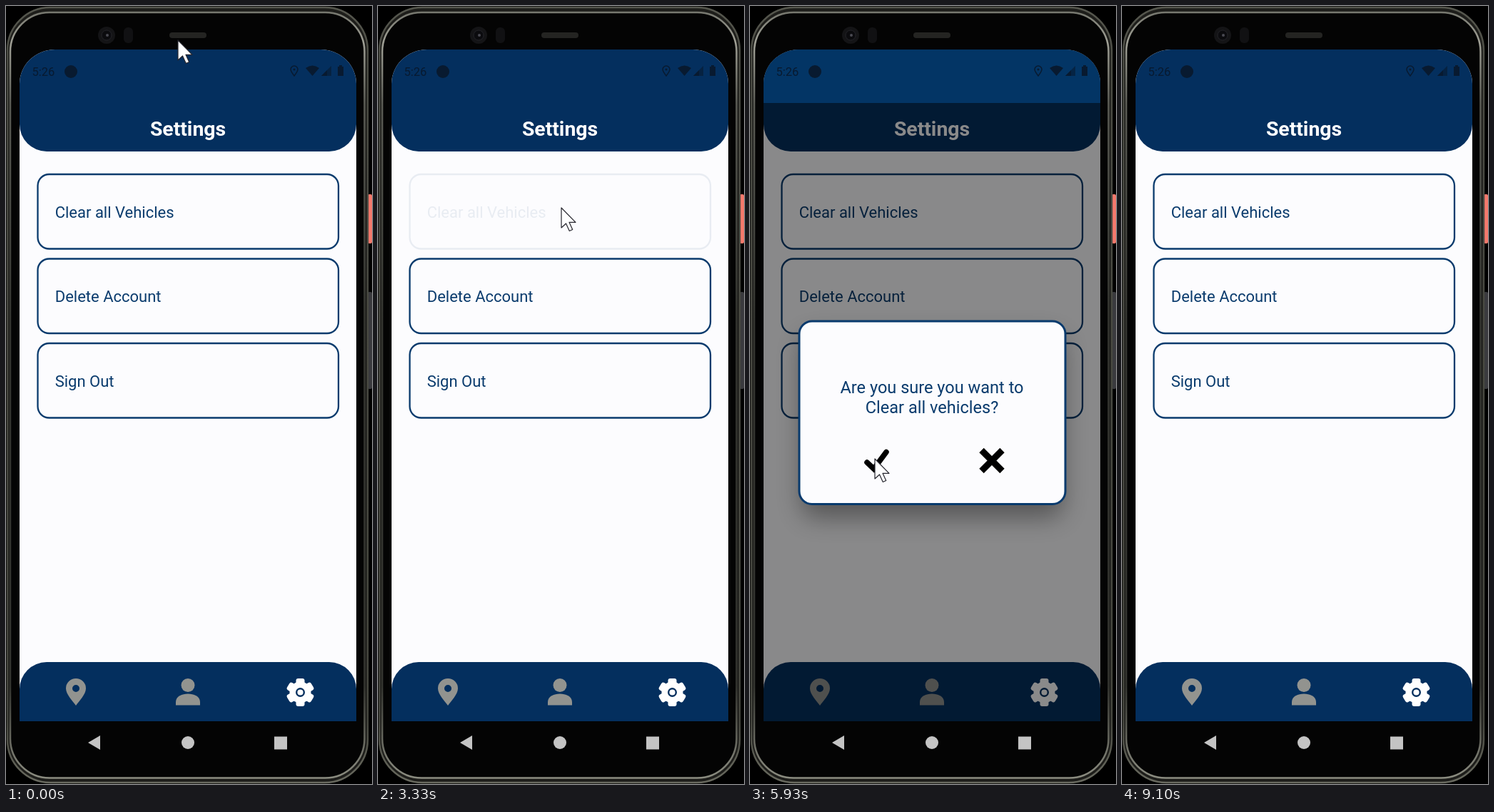
Write an HTML page that moves like this. It is 513 px wide and 1091 px high and loops after 9440 ms.

```html
<!DOCTYPE html>
<html lang="en">
<head>
<meta charset="utf-8">
<title>Settings</title>
<style>
  html, body { margin: 0; width: 100%; height: 100%; overflow: hidden; background: #000; }
  svg { display: block; width: 513px; height: 1091px; }
  text { font-family: Roboto, sans-serif; }
  .item rect { fill: none; stroke: #0a3b6d; stroke-width: 2.3; }
  .item text { fill: #0a3b6d; font-size: 22px; }
  .ask { fill: #0a3b6d; font-size: 23.55px; text-anchor: middle; }
</style>
</head>
<body>
<svg viewBox="0 0 513 1091">
  <defs>
    <clipPath id="screen"><path d="M19 1003V109A50 48 0 0 1 69 61H441A50 48 0 0 1 491 109V1003Z"/></clipPath>
    <linearGradient id="rim" x1="0" y1="0" x2="0" y2="1">
      <stop offset="0" stop-color="#56574e"/>
      <stop offset=".08" stop-color="#4a4b43"/>
      <stop offset=".92" stop-color="#45463e"/>
      <stop offset="1" stop-color="#6a6b60"/>
    </linearGradient>
    <linearGradient id="shine" x1="0" y1="0" x2="0" y2="1">
      <stop offset="0" stop-color="#77786f"/>
      <stop offset=".04" stop-color="#a0a096"/>
      <stop offset=".12" stop-color="#5a5b54"/>
      <stop offset=".4" stop-color="#33342f"/>
      <stop offset=".88" stop-color="#33342f"/>
      <stop offset="1" stop-color="#8b8c80"/>
    </linearGradient>
    <filter id="blur" x="-30%" y="-30%" width="160%" height="160%"><feGaussianBlur stdDeviation="17"/></filter>
  </defs>

  <!-- phone body -->
  <rect width="513" height="1091"/>
  <rect x="507" y="264" width="6" height="69" rx="2" fill="#f5796c"/>
  <rect x="507" y="401" width="6" height="136" rx="2" fill="#3a3a3e"/>
  <rect x="2" y="2" width="505" height="1087" rx="60" fill="#1d1d1a" stroke="url(#rim)" stroke-width="2.500"/>
  <rect x="6" y="9" width="496.500" height="1073.500" rx="55" fill="#040404" stroke="url(#shine)" stroke-width="2.500"/>
  <circle cx="141" cy="41" r="12" fill="#141416"/>
  <circle cx="141" cy="41" r="7" fill="#0b0b0e" stroke="#232328"/>
  <circle cx="142" cy="41" r="2" fill="#4a4a52"/>
  <rect x="165" y="30" width="13" height="22" rx="6" fill="#111113"/>
  <rect x="229" y="37" width="52" height="8" rx="4" fill="#242422"/>

  <g clip-path="url(#screen)">
    <rect x="19" y="61" width="472" height="942" fill="#fcfcfe"/>
    <path d="M19 61H491V166A38 38 0 0 1 453 204H57A38 38 0 0 1 19 166Z" fill="#042f5e"/>
    <text x="255" y="182" fill="#fff" font-size="28.4" font-weight="600" text-anchor="middle">Settings</text>
    <g id="items"></g>

    <path d="M19 1003V958A38 38 0 0 1 57 920H453A38 38 0 0 1 491 958V1003Z" fill="#042f5e"/>
    <path d="M98 981C93 974 84 965 84 957A14 14 0 0 1 112 957C112 965 103 974 98 981ZM98 952A5 5 0 1 0 98 962A5 5 0 1 0 98 952Z" fill="#92938f" fill-rule="evenodd"/>
    <g fill="#92938f">
      <circle cx="255" cy="952.5" r="9.5"/>
      <path d="M238 980.5V976C238 968 247 964.5 255 964.5S272 968 272 976V980.5Z"/>
    </g>
    <g id="gear" transform="translate(412.5 962.5)" fill="#fff"></g>

    <g id="dim">
      <rect x="19" y="136" width="472" height="867" fill="#000" opacity=".46"/>
      <rect x="19" y="61" width="472" height="75" fill="#033565"/>
    </g>

    <g fill="#081a30">
      <text x="36.5" y="98" font-size="16.5">5:26</text>
      <circle cx="91" cy="92" r="9"/>
      <path d="M404 98C401 94 399 91 399 89A5 5 0 0 1 409 89C409 91 407 94 404 98Z" fill="none" stroke="#081a30" stroke-width="1.5"/>
      <circle cx="404" cy="89" r="1.5"/>
      <path d="M420 87Q429.500 80 439 87L429.500 98Z"/>
      <path d="M442 98L456 84V98Z" opacity=".6"/>
      <path d="M442 98L450 90V98Z"/>
      <path d="M465 85H467V83H471V85H473V98H465Z"/>
    </g>
  </g>

  <g fill="#c4c4c4">
    <path d="M115 1033L132 1023V1043Z"/>
    <circle cx="255" cy="1033" r="9"/>
    <rect x="376" y="1024.500" width="18" height="18"/>
  </g>

  <g id="modal">
    <rect x="72" y="462" width="367" height="255" rx="20" opacity=".37" filter="url(#blur)"/>
    <rect x="69" y="441.500" width="373" height="256.500" rx="18" fill="#fcfcfe" stroke="#083a6d" stroke-width="3"/>
    <text class="ask" x="255" y="542.500">Are you sure you want to</text>
    <text class="ask" x="255" y="570">Clear all vehicles?</text>
    <path id="tick" d="M164 639.500L173.500 648.500L191 625" fill="none" stroke="#000" stroke-width="7.500" stroke-linecap="round"/>
    <path d="M324.500 622.500L353.500 651.500M353.500 622.500L324.500 651.500" stroke="#000" stroke-width="9"/>
  </g>

  <path id="cursor" d="M0 0V28L6.500 22L11.300 32.500L15.700 30.500L11 20.300H20Z" fill="#fff" stroke="#26262e" stroke-width="1.200" stroke-linejoin="round"/>
</svg>
<script>
const LOOP = 9440;
const $ = id => document.getElementById(id);
const clamp = v => Math.max(0, Math.min(1, v));
const ramp = (t, a, b) => clamp((t - a) / (b - a));
const ease = u => u * u * (3 - 2 * u);
const mix = (a, b, u) => a + (b - a) * u;

$('items').innerHTML = ['Clear all Vehicles', 'Delete Account', 'Sign Out'].map((label, i) => {
  const y = 236 + i * 118.5;
  return `<g class="item"><rect x="44.500" y="${y}" width="421.500" height="104.500" rx="16"/>
    <text x="68.700" y="${y + 60.5}">${label}</text></g>`;
}).join('');
const clearItem = $('items').firstElementChild;

$('gear').innerHTML = '<circle r="15"/>' +
  [0, 60, 120].map(a => `<rect x="-6" y="-19.500" width="12" height="39" rx="3" transform="rotate(${a})"/>`).join('') +
  '<circle r="5.300" fill="#fff" stroke="#042f5e" stroke-width="2.400"/>';

// time, x, y
const path = [
  [0, 241, 48], [150, 241, 48], [1000, 379, 233], [1330, 379, 233],
  [2100, 257, 283], [3800, 257, 283], [4330, 230, 578], [5130, 175, 635],
  [7500, 175, 635], [7600, 439, 545], [LOOP, 439, 545]
];

function cursorAt(t) {
  const i = path.findIndex(p => p[0] > t);
  const [a, b] = [path[i - 1], path[i]];
  const u = ramp(t, a[0], b[0]);
  const e = a[0] === 7500 ? u : ease(u);
  return [mix(a[1], b[1], e), mix(a[2], b[2], e)];
}

// lightly underdamped spring from 0 to 1
function spring(ms) {
  const s = Math.max(0, ms) / 1000;
  return 1 - Math.exp(-11 * s) * (Math.cos(10.44 * s) + 1.054 * Math.sin(10.44 * s));
}

// fades down on press and back on release
function pressed(t, down, held, up, low) {
  return t < up ? mix(1, low, ramp(t, down, held)) : mix(low, 1, ease(ramp(t, up, up + 250)));
}

function modalScale(t) {
  if (t < 6285) return spring(t - 3597);
  return 1 - ease(ramp(t, 6285, 6585));
}

function draw(t) {
  const [x, y] = cursorAt(t);
  $('cursor').setAttribute('transform', `translate(${x} ${y})`);
  $('cursor').style.display = t < 7630 ? '' : 'none';

  clearItem.setAttribute('opacity', pressed(t, 3270, 3330, 3530, 0.08));
  $('dim').setAttribute('opacity', ramp(t, 3545, 3600) * (1 - ramp(t, 7200, 7330)));
  $('tick').setAttribute('opacity', pressed(t, 6120, 6200, 6310, 0.2));

  const k = modalScale(t);
  $('modal').style.display = t > 3597 && k > 0.002 ? '' : 'none';
  $('modal').setAttribute('transform', `translate(255.500 570.500) scale(${k}) translate(-255.500 -570)`);
}

function tick() {
  draw(performance.now() % LOOP);
  requestAnimationFrame(tick);
}
tick();
</script>
</body>
</html>
```
